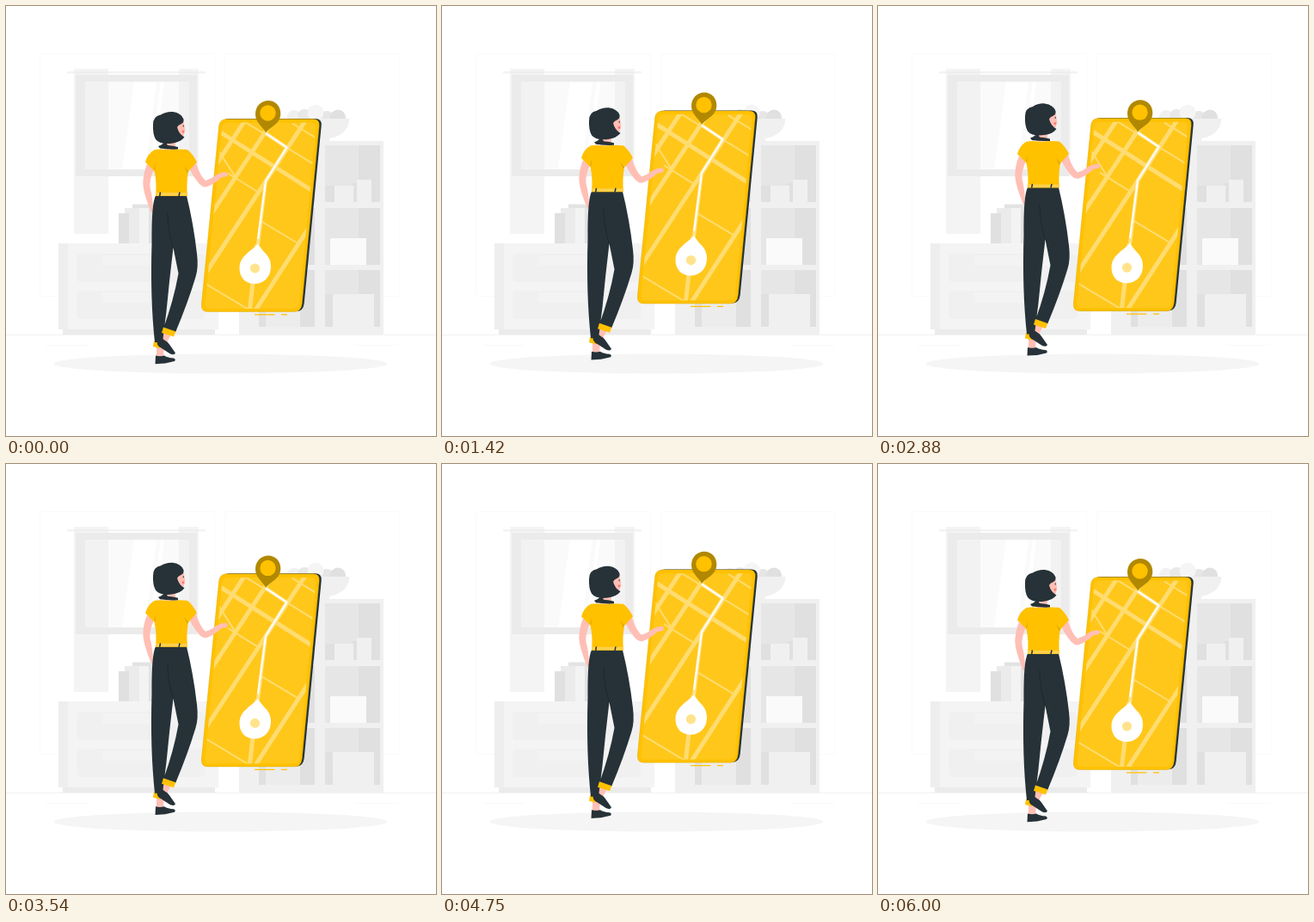
Write an HTML page that moves like this. It is 500 by 500 pixels and loops after 6.04 s.

```html
<!DOCTYPE html>
<html lang="en">
<head>
<meta charset="utf-8">
<title>Woman with a map phone</title>
<style>
html, body { margin: 0; width: 100%; height: 100%; overflow: hidden; background: #fff; }
svg { display: block; width: 100vw; height: 100vh; }
.skin { fill: #ffbfb5; }
.dark { fill: #263238; }
.gold { fill: #ffc100; }
.line { fill: none; stroke-linejoin: round; }
</style>
</head>
<body>
<svg viewBox="0 0 500 500">
  <defs>
    <path id="body" d="M257 131.400H357Q365 131.400 364.200 139.500L344.200 346Q343.300 355.500 335 355.500H234.500Q226.500 355.500 227.400 346.500L247.600 139.500Q248.500 131.400 257 131.400Z"/>
    <clipPath id="screen"><path d="M258 135.500H355Q361 135.500 360.400 141.500L341 345.500Q340.500 352 334 352H237Q231 352 231.500 346L251.200 141.500Q251.700 135.500 258 135.500Z"/></clipPath>
  </defs>

  <!-- walls and floor -->
  <g class="line" stroke="#fafafa">
    <rect x="39.500" y="55.500" width="203" height="282" rx="3"/>
    <rect x="254.500" y="55.500" width="203" height="282" rx="3"/>
    <path stroke="#f2f2f2" d="M0 382.500H500"/>
    <path stroke="#f8f8f8" d="M47 394.500H96M405 394.500H456"/>
  </g>

  <!-- window and curtains -->
  <path fill="#ebebeb" d="M81 80H222V198H81Z"/>
  <path fill="#fafafa" d="M92 88H213V190H92Z"/>
  <path fill="#fff" d="M149 88H175L162 190H135ZM180 88H184L171 190H167Z"/>
  <path fill="#f3f3f3" d="M71 76H232V78.500H71Z"/>
  <g fill="#ebebeb" opacity=".5">
    <path d="M79 73H119V265H79ZM201 73H224V198H201Z"/>
    <path d="M79 73H92V265H79ZM100 73H106V265H100ZM207 73H213V198H207Z" opacity=".7"/>
  </g>

  <!-- books and dresser -->
  <path fill="#e3e3e3" d="M147 230.500H190V276H147Z"/>
  <path fill="#ebebeb" d="M138 235H157V276H138Z"/>
  <path fill="#f3f3f3" d="M155 235H166V276H155Z"/>
  <path fill="#e0e0e0" d="M131 241H143V276H131Z"/>
  <path fill="#ebebeb" d="M66 375H243V382H66Z"/>
  <path fill="#f4f4f4" d="M61 276H247V376H61Z"/>
  <path fill="#eee" d="M61 276H72V376H61Z"/>
  <g fill="#f0f0f0">
    <rect x="82" y="288" width="149" height="33" rx="5"/>
    <rect x="82" y="331" width="149" height="33" rx="5"/>
  </g>
  <path fill="#f3f3f3" d="M112 290H200V302H112ZM112 333H200V345H112Z"/>

  <!-- fruit bowl -->
  <circle cx="335" cy="129" r="8" fill="#f0f0f0"/>
  <circle cx="347" cy="128" r="8" fill="#e8e8e8"/>
  <circle cx="373" cy="130" r="8" fill="#e6e6e6"/>
  <circle cx="386" cy="129.500" r="9" fill="#e0e0e0"/>
  <circle cx="360" cy="124" r="9.500" fill="#f5f5f5"/>
  <path fill="#f0f0f0" d="M322 131H399.500Q398 150 376 154V157H345V154Q323 150 322 131Z"/>

  <!-- shelves -->
  <path fill="#f0f0f0" d="M271 157H439V382H271Z"/>
  <path fill="#e0e0e0" d="M294 162H359V228H294ZM294 235H359V301H294ZM294 307H359V373H294Z"/>
  <path fill="#ececec" d="M302 320H342V373H302Z"/>
  <path fill="#e6e6e6" d="M371 162H435V228H371ZM371 235H435V301H371ZM371 307H435V373H371Z"/>
  <path fill="#e0e0e0" d="M410 162H435V228H410ZM410 235H435V301H410ZM410 307H435V373H410ZM371 209H382V228H371ZM402 206H410V228H402ZM371 335H380V373H371Z"/>
  <path fill="#f0f0f0" d="M382 209H404V228H382ZM408 202H425V228H408ZM380 335H428V373H380Z"/>
  <path fill="#fafafa" d="M377 270H419V301H377Z"/>

  <ellipse cx="249.500" cy="416" rx="194" ry="11.500" fill="#f5f5f5"/>

  <g id="phone">
    <use href="#body" class="dark" x="2.500" y="-.5"/>
    <use href="#body" class="gold" stroke="#d6a200" stroke-width=".4"/>
    <g clip-path="url(#screen)">
      <path fill="#ffc71a" d="M225 130H365V356H225Z"/>
      <g class="line" stroke="#ffdc70">
        <path stroke-width="5" d="M248 146L358 216M277 134.500L244 185M309 135L236 246M349 132L228 317M354 255L288 357M292 277L283 357"/>
        <path stroke-width="2" d="M274 132.500L362 186.500M333 136.500L362 154.500M248 169.500L268 201M258 194.500L294 217M297 250.500L342 277.500M228 320.500L288 356.500"/>
      </g>
      <path class="line" stroke="#ffe38c" stroke-width="4" d="M302 148L326.500 164.500L302 203.500L293 277"/>
    </g>
    <path class="line" stroke="#fff" stroke-width="2" d="M302 148L326.500 164.500L302 203.500L293 271"/>
    <path fill="#fff" d="M293 276Q296 282 303 289Q308 295 308 303C308 315 300 323 289 323C278 323 271 315 271.500 304C272 290 286 285 293 276Z"/>
    <circle cx="289.500" cy="305" r="5.600" fill="#ffe38c"/>
    <path fill="#b18800" d="M305 110C313 110 319.500 116.300 319.300 125.300C319 137 309 139.300 302 147.300C299 140.300 290 136.300 290 125.800C290 116.300 297 110 305 110Z"/>
    <circle class="gold" cx="304.500" cy="124.500" r="9.200"/>
    <path class="line" stroke="#ffc100" stroke-width="1.200" d="M289 358.900H312.500M320 358.900H327"/>
  </g>

  <g id="woman">
    <!-- arms -->
    <path class="skin" d="M164 184L172 190Q166.500 202 167.500 211Q171 223 171 240H169Q160 219 159.300 207Q159.500 194 164 184Z"/>
    <path class="skin" d="M221 183Q226 198 232 203Q239 201 245 196Q250 193 256 193Q259 195 257 198L250 199.500Q244 206 234 210Q229 211.500 225 207Q217 198 213 188Z"/>
    <!-- feet and legs -->
    <path class="skin" d="M175 394H184L183 409H175ZM183 378L192 382L187 391L179 389Z"/>
    <path class="gold" d="M172 389.500L181 391L179 398L171 396Z"/>
    <path class="dark" d="M174 406.500Q179 408 184 406.500Q188 409 195 409.500Q198 411 196 413L185 415.500L173.500 416.200Z"/>
    <path class="dark" d="M174 220.500H210Q218 253 222 288Q224 304 220.500 315Q211.500 345 197 379.500L183 375Q195 342 200.500 311L194.500 281Q190 318 186.500 355L182 391H173Q167.500 340 169.500 276Q169 230 174 220.500Z"/>
    <path class="line" stroke="#1b252a" stroke-width=".7" d="M188 240Q188 262 194.500 281"/>
    <path class="gold" d="M183 373.500L197.300 378.500L195 384.500L181 380Z"/>
    <path class="dark" d="M176 388Q181 385 185 389Q188 390 190 393.500L197 403.500Q196 406.500 191 404.500L181 398Q174 395 176 388Z"/>
    <!-- shirt -->
    <path class="skin" d="M184 155H197V167H184Z"/>
    <path class="gold" d="M180 166.500Q190 168 200 166.500L211 167Q218 173 222 181.500L212 192.500Q209.500 206 211 221H174Q175.500 205 172.500 192L162 181.500Q165 171 173 167Z"/>
    <path fill="#d6a200" d="M174 183L173.500 190L172 191.500ZM207 186L212 192.500L211 194Z"/>
    <path fill="#ffd04d" d="M175 217H210.500L211 220.500H174.500Z"/>
    <path class="line" stroke="#263238" stroke-width="1.500" d="M179.500 216.500L178.700 221M202 216.500L201 221"/>
    <path class="dark" d="M177 163Q183 161 185 157L188 162Q195 162.500 200 164V166.500Q189 167 179 165.500Z"/>
    <!-- head -->
    <path class="skin" d="M197 138L206.500 133L208.300 144L206.500 151L199 153Z"/>
    <ellipse cx="206" cy="146" rx="1.500" ry="1.500" fill="#ff7970"/>
    <path class="line" stroke="#263238" d="M206.200 138.500V140.500"/>
    <path class="dark" d="M171 138Q171 128 180 126.500Q186 122.500 194 123Q204 124.500 206.500 131.500Q207 135.500 204 137Q200 138.500 199 141Q201 149 207.500 152.500Q203 158.500 193 159.700Q179 161.500 174 155Q170.500 149 171 138Z"/>
  </g>
</svg>
<script>
const LOOP = 6040, FPS = 24;
const phone = document.getElementById('phone');
const woman = document.getElementById('woman');

// Linear rise to `height` and back once per period.
const lift = (t, period, height) =>
  height * (1 - Math.abs(1 - 2 * (t % period) / period));

const move = (el, y) => el.setAttribute('transform', `translate(0 ${-y})`);

function draw(now) {
  const step = Math.floor((now % LOOP) * FPS / 1000 + 0.1);
  const t = step * 1000 / FPS;
  move(phone, lift(t, 3000, 10));
  move(woman, lift(t, 6000, 10));
}

const start = performance.now();
function tick() {
  draw(performance.now() - start);
  requestAnimationFrame(tick);
}
tick();
</script>
</body>
</html>
```
